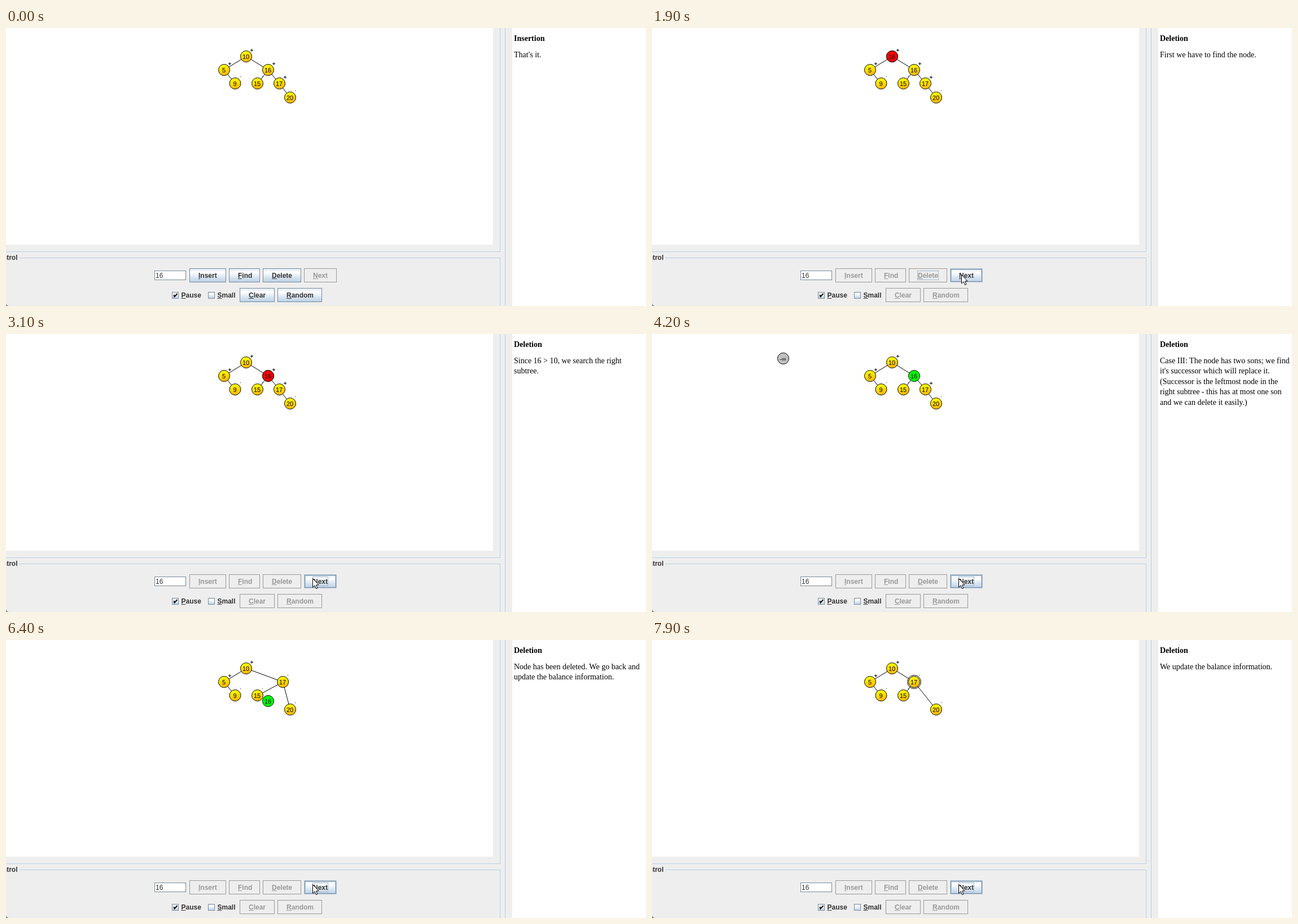
Animation, 1134 px wide and 494 px high, one loop 8 s. Source, as an HTML page with a canvas:

```html
<!DOCTYPE html>
<html lang="en">
<head>
<meta charset="utf-8">
<title>AVL tree deletion</title>
<style>
html, body { margin: 0; width: 100%; height: 100%; overflow: hidden; background: #eee; }
canvas { display: block; }
</style>
</head>
<body>
<canvas id="stage" width="1134" height="494"></canvas>
<script>
const ctx = document.getElementById('stage').getContext('2d');
const LOOP = 8000, TICK = 100;
const SANS = '"Liberation Sans", Arial, sans-serif';
const SERIF = '"Liberation Serif", "Times New Roman", serif';
const SHADOW = '#7a8a99', BLUE = '#b8cfe5', INK = '#333', DIM = '#999';

// Resting places of the tree nodes
const P = {
  n10: [425, 50], n5: [386, 74], n9: [405.5, 98.5], n16: [464, 74],
  n15: [445, 98.5], n17: [484, 98.5], n20: [503, 123], beside: [493, 74]
};

const BUTTONS = [
  ['Insert', 325, 427, 65], ['Find', 395, 427, 55], ['Delete', 455, 427, 68],
  ['Next', 528, 427, 58], ['Clear', 414, 462, 62], ['Random', 481, 462, 79]
];

// Pointer path: tick, x, y
const POINTER = [
  [3, 912, 233], [4, 827, 266], [5, 723, 351], [6, 600, 415], [7, 530, 436],
  [8, 505, 441], [9, 493, 441], [10, 487, 441], [11, 485, 441], [18, 517, 439],
  [19, 548, 438], [20, 553, 439], [21, 557, 439], [24, 543, 434]
];

const PAGES = [
  [0, 'Insertion', ["That's it."]],
  [12, 'Deletion', ['First we have to find the node.']],
  [26, 'Deletion', ['Since 16 > 10, we search the right', 'subtree.']],
  [40, 'Deletion', ['Case III: The node has two sons; we find', "it's successor which will replace it.",
    '(Successor is the leftmost node in the', 'right subtree - this has at most one son', 'and we can delete it easily.)']],
  [64, 'Deletion', ['Node has been deleted. We go back and', 'update the balance information.']],
  [79, 'Deletion', ['We update the balance information.']]
];
const NEXT_PRESSES = [25, 39, 54, 63, 78];

const latest = (list, tick) => list.filter(item => item[0] <= tick).pop();

function rect(x, y, w, h, color) {
  ctx.fillStyle = color;
  ctx.fillRect(x, y, w, h);
}

function frame(x, y, w, h, color) {
  ctx.strokeStyle = color;
  ctx.lineWidth = 1;
  ctx.strokeRect(x + 0.5, y + 0.5, w - 1, h - 1);
}

function label(text, x, y, font, color = '#000', align = 'left') {
  ctx.font = font;
  ctx.fillStyle = color;
  ctx.textAlign = align;
  ctx.fillText(text, x, y);
}

function mnemonic(text, x, y, color) {
  label(text, x, y, `bold 12px ${SANS}`, color);
  rect(x, y + 1, Math.round(ctx.measureText(text[0]).width), 1, color);
}

function oceanFill(x, y, w, h) {
  const g = ctx.createLinearGradient(0, y, 0, y + h);
  [[0, '#dde8f3'], [0.3, '#fff'], [0.6, '#dde8f3'], [1, BLUE]].forEach(s => g.addColorStop(...s));
  rect(x, y, w, h, g);
}

function button([text, x, y, w], { enabled, hover, pressed, focus }) {
  const h = 25;
  if (!enabled) {
    rect(x, y, w, h, '#eee');
    frame(x, y, w, h, DIM);
  } else if (pressed) {
    rect(x, y, w, h, BLUE);
    frame(x, y, w, h, SHADOW);
    rect(x + 1, y + 1, w - 2, 1, SHADOW);
    rect(x + 1, y + 1, 1, h - 2, SHADOW);
  } else {
    oceanFill(x, y, w, h);
    if (hover) {
      frame(x, y, w, h, BLUE);
      frame(x + 1, y + 1, w - 2, h - 2, SHADOW);
      frame(x + 2, y + 2, w - 4, h - 4, BLUE);
    } else frame(x, y, w, h, SHADOW);
  }
  if (focus) frame(x + 15, y + 4, w - 30, 17, '#a3b8cc');
  mnemonic(text, x + 16, y + 17, enabled ? INK : DIM);
}

function checkbox(text, x, checked) {
  oceanFill(x, 469, 12, 12);
  frame(x, 469, 12, 12, SHADOW);
  if (checked) {
    ctx.strokeStyle = '#111';
    ctx.lineWidth = 2;
    ctx.beginPath();
    ctx.moveTo(x + 3.5, 474);
    ctx.lineTo(x + 4.5, 477.5);
    ctx.lineTo(x + 9.5, 472);
    ctx.stroke();
  }
  mnemonic(text, x + 16.5, 479, INK);
}

function panels() {
  rect(0, 0, 1134, 494, '#eee');
  rect(0, 0, 863, 385, '#fff');
  rect(897, 0, 237, 494, '#fff');
  rect(875, 0, 1, 398, BLUE);
  rect(0, 397, 876, 1, BLUE);
  rect(23, 408, 853, 1, BLUE);
  rect(875, 408, 1, 86, BLUE);
  rect(884, 0, 1, 494, BLUE);
  label('Control', 20.5, 412, `bold 12px ${SANS}`, INK, 'right');
  ctx.fillStyle = '#888';
  ctx.beginPath();
  ctx.moveTo(0, 489);
  ctx.quadraticCurveTo(1, 493, 5, 494);
  ctx.lineTo(0, 494);
  ctx.fill();
}

function controls(tick, pointer) {
  const busy = tick >= 12;
  rect(263, 431, 56, 17, '#fff');
  frame(263, 431, 56, 17, SHADOW);
  label('16', 265, 444, `12px ${SANS}`, INK);
  for (const b of BUTTONS) {
    const [text, x, y, w] = b;
    const isNext = text === 'Next', isDelete = text === 'Delete';
    button(b, {
      enabled: isNext === busy,
      hover: pointer && pointer[1] >= x && pointer[1] < x + w && pointer[2] >= y && pointer[2] < y + 25,
      pressed: isNext ? NEXT_PRESSES.includes(tick) : isDelete && tick === 11,
      focus: isNext ? tick >= 25 : isDelete && tick >= 11 && tick < 25
    });
  }
  checkbox('Pause', 294, true);
  checkbox('Small', 358, false);
}

function node(key, [x, y], color, balance) {
  x += 0.5;
  y = Math.floor(y) + 0.5;
  if (!color) {
    color = ctx.createLinearGradient(x - 3, y - 10, x + 3, y + 10);
    color.addColorStop(0, '#ff0');
    color.addColorStop(1, '#ffb400');
  }
  ctx.beginPath();
  ctx.arc(x, y, 10, 0, 2 * Math.PI);
  ctx.fillStyle = color;
  ctx.fill();
  ctx.strokeStyle = '#000';
  ctx.lineWidth = 1;
  ctx.stroke();
  label(key, x - 0.5, y + 4, `11px ${SANS}`, '#000', 'center');
  const bx = Math.floor(x) + 9, by = Math.floor(y) - 11;
  if (balance === '+') {
    rect(bx - 1, by, 5, 1, '#000');
    rect(bx + 1, by - 2, 1, 5, '#000');
  } else if (balance === '.') rect(bx, by - 1, 1, 1, '#000');
}

function edges(...pairs) {
  ctx.strokeStyle = '#000';
  ctx.lineWidth = 1;
  ctx.beginPath();
  for (const [a, b] of pairs) {
    ctx.moveTo(a[0] + 0.5, a[1] + 0.5);
    ctx.lineTo(b[0] + 0.5, b[1] + 0.5);
  }
  ctx.stroke();
}

// A move takes ten steps, two of them in each tick
const glide = (from, to, k) => {
  const s = Math.max(0, Math.min(10, 2 * k + 1)) / 10;
  return from.map((v, i) => v + (to[i] - v) * s);
};

function tree(tick) {
  ctx.save();
  ctx.beginPath();
  ctx.rect(0, 0, 863, 385);
  ctx.clip();

  const unlinked = tick >= 55, replaced = tick >= 64;
  const spare = replaced ? glide(P.beside, P.n16, tick - 64) : glide(P.n17, P.beside, tick - 55);
  const top = replaced ? spare : P.n16;
  edges([P.n10, P.n5], [P.n5, P.n9], [P.n10, top], [top, P.n15]);
  if (unlinked) edges([top, P.n20]);
  else edges([top, P.n17], [P.n17, P.n20]);

  node('10', P.n10, null, '+');
  node('5', P.n5, null, '+');
  node('9', P.n9, null, '.');
  node('15', P.n15, null, '.');
  node('20', P.n20, null, '.');
  if (!unlinked) node('17', P.n17, null, '+');
  if (tick < 40) node('16', P.n16, null, '+');
  else if (!replaced) node('16', P.n16, '#0f0');
  if (unlinked) node('17', spare, null, '.');

  if (tick >= 12 && tick < 26) node('16', glide([-22, -14], P.n10, tick - 12), '#f00');
  if (tick >= 26 && tick < 40) node('16', glide(P.n10, P.n16, tick - 26), '#f00');
  if (tick >= 40 && tick < 55) node('-∞', glide([-20, -12], P.n17, tick - 40), '#c0c0c0');
  if (replaced && tick < 69) {
    const step = [1, 3, 5, 6, 8][tick - 64];
    node('16', [464, 74 + 34 * step], '#0f0');
  }
  if (tick >= 79) {
    ctx.beginPath();
    ctx.arc(464.5, 74.5, 12, 0, 2 * Math.PI);
    ctx.strokeStyle = '#000';
    ctx.stroke();
  }
  ctx.restore();
}

function commentary(tick) {
  const [, title, lines] = latest(PAGES, tick);
  label(title, 900, 23, `bold 14px ${SERIF}`);
  lines.forEach((line, i) => label(line, 900, Math.round(52 + 18.4 * i), `14px ${SERIF}`));
}

function arrow([, x, y]) {
  ctx.beginPath();
  [[0, 0], [0, 15.5], [3.5, 12.3], [6, 18], [8.5, 17], [6, 11.5], [10.5, 11.2]]
    .forEach(([dx, dy]) => ctx.lineTo(x + 0.5 + dx, y + 0.5 + dy));
  ctx.closePath();
  ctx.fillStyle = '#fff';
  ctx.fill();
  ctx.strokeStyle = '#000';
  ctx.lineWidth = 1;
  ctx.stroke();
}

function draw(ms) {
  const tick = Math.floor(ms / TICK);
  const pointer = latest(POINTER, tick);
  panels();
  tree(tick);
  controls(tick, pointer);
  commentary(tick);
  if (pointer) arrow(pointer);
}

const start = performance.now();
function loop() {
  draw((performance.now() - start) % LOOP);
  requestAnimationFrame(loop);
}
loop();
</script>
</body>
</html>
```
